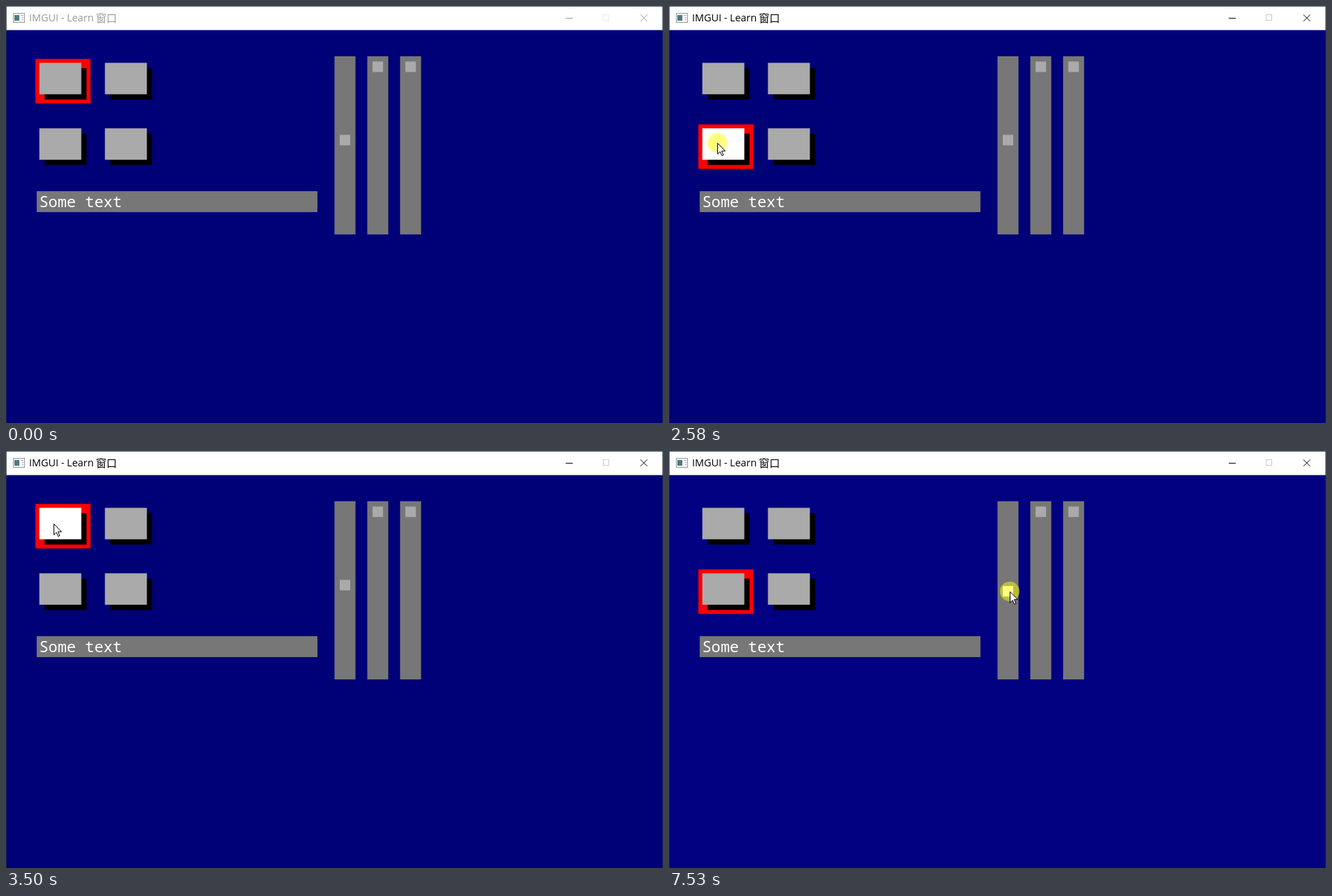
Recreate the animation shown at these times as an HTML page. Size 939x597 px, loop 7990 ms.

```html
<!DOCTYPE html>
<html lang="en">
<head>
<meta charset="utf-8">
<title>IMGUI</title>
<style>
  html, body { margin: 0; width: 100%; height: 100%; overflow: hidden; background: #fff; }
  svg { display: block; }
  .caption { font: 14.4px "Open Sans", "Noto Sans", sans-serif; }
  .cjk { font: 15px "Noto Sans CJK SC", "Noto Sans CJK", sans-serif; }
  .field { font: 300 21.87px "Noto Sans Mono", "Liberation Mono", monospace; fill: #fff; }
  #bar { color: #000; --max: #ccc; }
  #bar.idle { color: #999; --max: #e9e9e9; }
</style>
</head>
<body>
<svg width="939" height="597" viewBox="0 0 939 597">
  <rect width="939" height="597" fill="#29323f"/>
  <rect x=".75" y=".75" width="937.5" height="34.25" fill="#fff"/>
  <g id="bar">
    <rect x="10.5" y="10.5" width="16" height="13" fill="#f4f4f4" stroke="#999"/>
    <rect x="12" y="13" width="7" height="8" fill="#4d7b80"/>
    <path d="M21 13.5h4M23 16.5h2M23 19.5h2" stroke="#b5b5b5"/>
    <text class="caption" x="33" y="22" fill="currentColor">IMGUI - Learn</text>
    <text class="cjk" x="128.5" y="22.5" fill="currentColor">窗口</text>
    <path d="M800 17.5h10M906.8 12.3l9.6 9.6M916.4 12.3l-9.6 9.6" stroke="currentColor" fill="none"/>
    <rect x="853.5" y="12.5" width="8" height="8" fill="none" style="stroke: var(--max)"/>
  </g>
  <g id="client" transform="translate(.75 34.5) scale(.9375)">
    <rect id="bg" width="1000" height="600"/>
  </g>
  <text class="field" x="47.5" y="288">Some text</text>
  <rect id="caret" x="166" y="286" width="12" height="2" fill="#fff"/>
  <g id="mouse">
    <circle id="press" r="14" fill="#ff0" fill-opacity=".5"/>
    <path d="M.5 .5V16L4.1 12.6 6.6 18.3 8.8 17.3 6.4 11.7H11.4Z" fill="#fff" stroke="#000"/>
  </g>
</svg>
<script>
const LOOP = 7990, STEP = 50, NAVY = 0x000077, PINK = 0xe191f6, TEXT = 4;
const $ = id => document.getElementById(id);
const show = (el, on) => el.setAttribute('visibility', on ? 'visible' : 'hidden');
const local = m => ({ x: (m.x - 0.75) / 0.9375, y: (m.y - 34.5) / 0.9375 });

function rect(x, y, width, height, fill) {
  const el = document.createElementNS('http://www.w3.org/2000/svg', 'rect');
  for (const [k, v] of Object.entries({ x, y, width, height, fill })) el.setAttribute(k, v);
  return $('client').appendChild(el);
}

// Hit area of a widget, in client coordinates.
const area = (x, y, w, h) => p => p.x >= x && p.x < x + w && p.y >= y && p.y < y + h;

function button(x, y, release = c => c) {
  const ring = rect(x - 6, y - 6, 84, 68, '#f00');
  rect(x + 8, y + 8, 64, 48, '#000');
  const face = rect(x, y, 64, 48, '#aaa');
  return {
    ring, release, clickFocus: true, hit: area(x, y, 64, 48),
    draw: hot => face.setAttribute('fill', hot ? '#fff' : '#aaa')
  };
}

function field(x, y) {
  const ring = rect(x - 6, y - 6, 432, 36, '#f00');
  const body = rect(x - 4, y - 4, 428, 32, '#777');
  return {
    ring, hit: area(x - 4, y - 4, 428, 32),
    draw: hot => body.setAttribute('fill', hot ? '#aaa' : '#777')
  };
}

// Edits the bits of the background colour selected by shift and max.
function slider(x, y, max, shift) {
  const ring = rect(x - 4, y - 4, 40, 280, '#f00');
  rect(x, y, 32, 272, '#777');
  const knob = rect(x + 8, y + 8, 16, 16, '#aaa');
  return {
    ring, hit: area(x + 8, y + 8, 16, 255),
    drag: (c, p) => c & ~(max << shift) | Math.floor((p.y - y - 8) * max / 255) << shift,
    draw(hot, color) {
      knob.setAttribute('y', y + 8 + 240 * (color >> shift & max) / max);
      knob.setAttribute('fill', hot ? '#fff' : '#aaa');
    }
  };
}

const widgets = [
  button(50, 50, () => NAVY), button(150, 50),
  button(50, 150, () => PINK), button(150, 150),
  field(50, 250),
  slider(500, 40, 255, 0), slider(550, 40, 63, 10), slider(600, 40, 15, 20)
];

const enter = { x: 430, y: 600 };
const moves = [
  { from: 460, to: 1180, x: 93, y: 104 },
  { from: 1610, to: 2020, x: 190, y: 115 },
  { from: 2300, to: 2580, x: 69, y: 196 },
  { from: 3220, to: 3430, x: 68, y: 104 },
  { from: 6890, to: 7240, x: 536, y: 165 },
  { from: 7240, to: 7530, x: 487, y: 201 }
];
const presses = [[1230, 1330], [2020, 2250], [2580, 2680], [3430, 3500], [7530, LOOP]];

// Tab is hit faster and faster, then once more after a pause.
const tabs = Array.from({ length: 9 }, (_, n) => 4466 + 262 * n - 8 * n * n).concat(6410);

// Each move slows down towards its end and advances once per STEP.
function pointer(t) {
  let { x, y } = enter;
  for (const m of moves) {
    if (t < m.from) break;
    const done = (Math.floor((t - m.from) / STEP) + 1) * STEP;
    const left = 1 - Math.min(1, done / (m.to - m.from));
    const u = 1 - left * left;
    x += (m.x - x) * u;
    y += (m.y - y) * u;
  }
  return { x: Math.round(x), y: Math.round(y) };
}

function state(t) {
  let color = NAVY, focus = 0, pressed = false;
  for (const [down, up] of presses) {
    if (t < down) break;
    pressed = t < up;
    const p = local(pointer(Math.min(t, up)));
    const i = widgets.findIndex(w => w.hit(p)), w = widgets[i];
    if (!w) continue;
    if (w.clickFocus) focus = i;
    if (w.drag) color = w.drag(color, p);
    if (w.release && !pressed) color = w.release(color);
  }
  focus = (focus + tabs.filter(k => k <= t).length) % widgets.length;
  return { color, focus, pressed };
}

function draw(t) {
  const m = pointer(t), p = local(m), { color, focus, pressed } = state(t);
  $('bar').classList.toggle('idle', t < presses[0][0]);
  $('bg').setAttribute('fill', '#' + color.toString(16).padStart(6, '0'));
  widgets.forEach((w, i) => {
    show(w.ring, i === focus);
    w.draw(w.hit(p), color);
  });
  show($('caret'), focus === TEXT && Math.floor((t + 66) / 256) % 2 === 0);
  show($('press'), pressed);
  show($('mouse').lastElementChild, t >= moves[0].from);
  $('mouse').setAttribute('transform', `translate(${m.x} ${m.y})`);
}

const start = performance.now();
function tick() {
  draw((performance.now() - start) % LOOP);
  requestAnimationFrame(tick);
}
tick();
</script>
</body>
</html>
```
